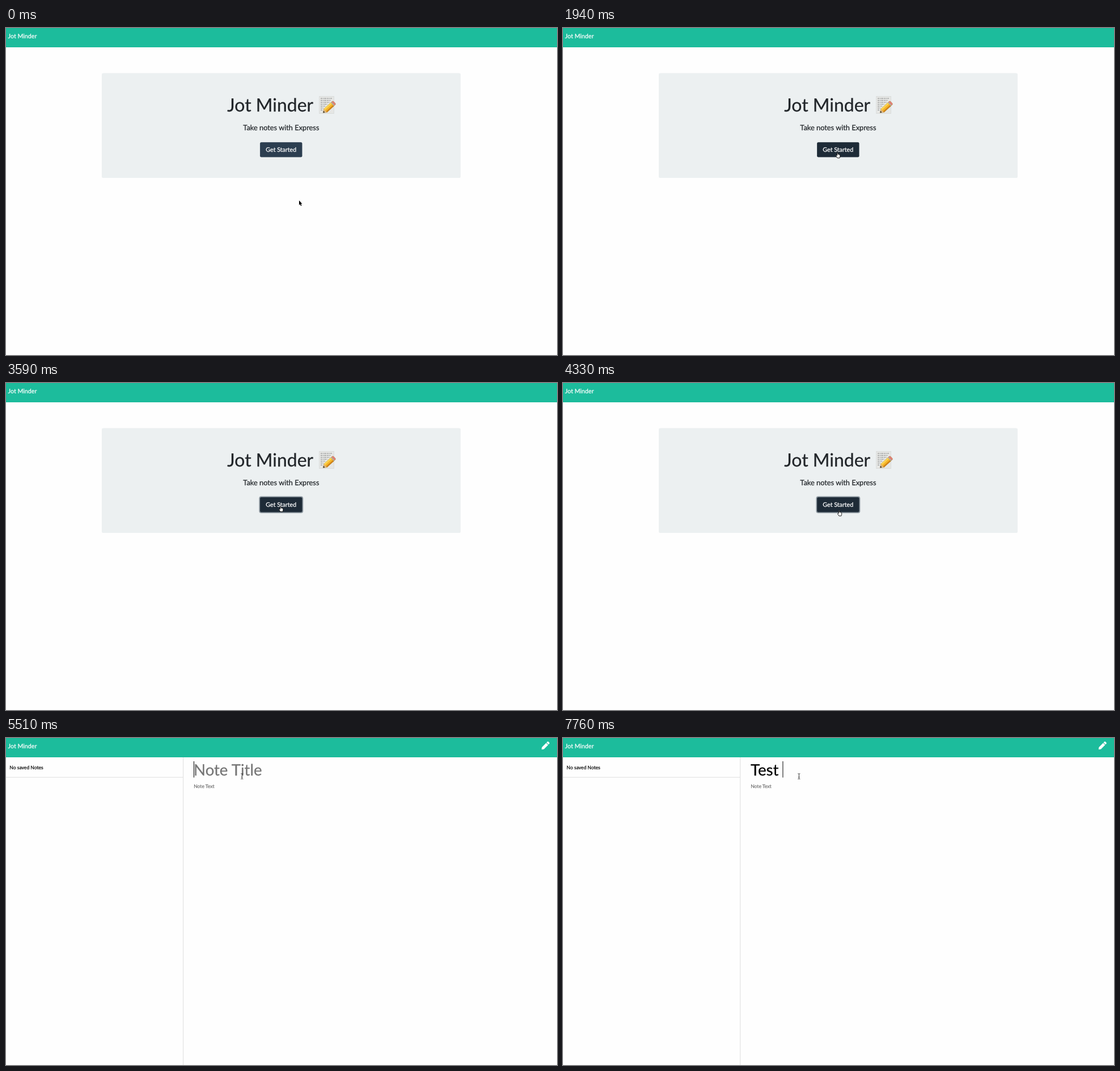
An HTML page for the animation above (8000 ms loop, 972x576 px).

```html
<!DOCTYPE html>
<html lang="en">
<head>
<meta charset="utf-8">
<title>Jot Minder</title>
<style>
  html, body { margin: 0; width: 100%; height: 100%; overflow: hidden; background: #fefefe; }
  svg { display: block; width: 972px; height: 576px; }
  text { font-family: Lato, "Open Sans", sans-serif; text-rendering: geometricPrecision; stroke-width: .25px; }
  .mid { text-anchor: middle; fill: #212529; stroke: #212529; }
  .brand, .label { font-size: 10.69px; fill: #fff; stroke: #fff; }
  .label { text-anchor: middle; }
  .small { font-size: 8.55px; }
  .title { font-size: 27.6px; }
  .off { display: none; }
</style>
</head>
<body>
<svg viewBox="0 0 972 576">
  <rect width="972" height="576" fill="#fefefe"/>
  <rect width="972" height="34" fill="#1cbc9c"/>
  <text class="brand" x="3.6" y="17.6">Jot Minder</text>

  <g id="home">
    <rect x="169" y="79.5" width="633" height="184.5" rx="2.6" fill="#ecf0f1"/>
    <text class="mid" x="466.3" y="147.2" font-size="32">Jot Minder</text>
    <g id="memo">
      <rect x="552.8" y="120.5" width="25.6" height="30.2" fill="#e6e7e5" stroke="#d0d2d1" stroke-width=".6"/>
      <path d="M555 124h20m-20 3.4h18m-18 3.4h16m-16 3.4h12m-12 3.4h8m-8 3.4h5m-5 3.4h4"
            stroke="#858787" stroke-width="1" stroke-dasharray="3 .9 1.6 .7 4 1" fill="none"/>
      <g transform="translate(559.4 149.2) rotate(-42)">
        <path d="M0 0L5.5-4H24.5Q27-4 27-2V2Q27 4 24.5 4H5.5Z" fill="#f6b62b" stroke="#8a6a2c" stroke-width=".5"/>
        <path d="M5.5-4H22V-1.4H5.5Z" fill="#fcd654"/>
        <path d="M5.5 1.8H22V4H5.5Z" fill="#d08218"/>
        <path d="M0 0L5.5-4V4Z" fill="#dfb77c"/>
        <path d="M0 0L2.6-1.9V1.9Z" fill="#333"/>
        <path d="M22-4H23.8V4H22Z" fill="#a9adaf"/>
        <path d="M23.8-4H24.5Q27-4 27-2V2Q27 4 24.5 4H23.8Z" fill="#dd8079"/>
      </g>
    </g>
    <text class="mid" x="485.4" y="180" font-size="12.8">Take notes with Express</text>
    <rect id="ring" x="446.4" y="199.6" width="77.9" height="29.7" rx="3.8" fill="#8c979f"/>
    <rect id="button" x="448.1" y="201.2" width="74.4" height="26.4" rx="2.4"/>
    <text class="label" x="485.3" y="218.3">Get Started</text>
  </g>

  <g id="notes">
    <path d="M0 69.2H312.5M312.7 34V576" stroke="#dedede" fill="none"/>
    <text class="small" x="6.3" y="54.6" fill="#111" stroke="#111">No saved Notes</text>
    <path transform="translate(944.8 6.2) scale(.0275)" fill="#fff"
      d="M498 142L452 188Q443 197 435 188L324 77Q315 69 324 60L370 14Q404-14 438 14L498 74Q526 108 498 142ZM284 100L22 362L0 484Q0 514 28 512L150 490L412 228Q421 219 412 211L301 100Q293 92 284 100Z"/>
    <text class="title" id="title" x="331" y="65.8"></text>
    <rect id="caret" y="41" width="1" height="28.6" fill="#000"/>
    <text class="small" x="331.2" y="87.8" fill="#757575" stroke="#757575">Note Text</text>
  </g>

  <g id="cursor">
    <path id="arrow" d="M0 0V8.2L1.8 6.5L3.1 9.6L4.5 9L3.2 6H5.5Z" stroke="#fff" stroke-width=".6" paint-order="stroke"/>
    <path id="hand" d="M2.2 5.5V1Q2.9-.2 3.6 1V3.4Q4.5 2.9 5 3.7Q5.8 3.3 6.3 4.1Q7.4 4 7.4 5.2V7.2L6.6 9.9H2.7L.4 6.6Q.1 5.2 1.2 5.3Z"
      fill="#fff" stroke="#111" stroke-width=".95" stroke-linejoin="round"/>
    <path id="beam" d="M-2-4.7H-.8L0-4.1L.8-4.7H2M0-4.1V4.1M-2 4.7H-.8L0 4.1L.8 4.7H2M-1 1.5H1" fill="none" stroke="#222" stroke-width=".9"/>
  </g>
</svg>
<script>
// The screen refreshes in ticks; all moments below count ticks.
const LOOP = 8000, TICK = 148.9;
const HOVER = 13, PRESS = 22, OPEN = 30, FOCUS = 37, BLINK = 2;
const TYPED = "Test\u00a0", KEYS = [43, 46, 47, 51, 52];
const FIELD_X = 331;

// Resting points of the pointer: tick, x, y
const STOPS = [
  [0, 517, 303.8], [4, 411.6, 332.8], [6, 418.5, 317.5], [7, 418.5, 317.5],
  [8, 477, 313.8], [15, 481.5, 216.8], [25, 481.5, 216.8], [29, 484.2, 224.2],
  [OPEN, 487.5, 223], [36, 416.3, 67.5]
];

const $ = id => document.getElementById(id);
const show = (id, on) => $(id).classList.toggle("off", !on);
const easeOut = p => 1 - (1 - p) ** 3;

function pointer(n) {
  const next = STOPS.findIndex(stop => stop[0] > n);
  if (next < 0) return STOPS[STOPS.length - 1].slice(1);
  const [t0, x0, y0] = STOPS[next - 1], [t1, x1, y1] = STOPS[next];
  const p = easeOut((n - t0) / (t1 - t0));
  return [x0 + (x1 - x0) * p, y0 + (y1 - y0) * p];
}

function drawHome(n) {
  $("button").setAttribute("fill", n >= HOVER ? "#1e2b37" : "#2c3e50");
  show("ring", n >= PRESS);
  $("ring").setAttribute("opacity", Math.min(1, (n - PRESS + 1) / 2));
}

function drawNotes(n) {
  const text = TYPED.slice(0, KEYS.filter(key => key <= n).length);
  const title = $("title"), color = text ? "#000" : "#757575";
  title.textContent = text || "Note Title";
  title.setAttribute("fill", color);
  title.setAttribute("stroke", color);
  show("caret", text || (n >= FOCUS && n < FOCUS + BLINK));
  $("caret").setAttribute("x", FIELD_X + (text ? title.getComputedTextLength() : 0));
}

function draw(n) {
  const open = n >= OPEN, hover = n >= HOVER;
  show("home", !open);
  show("notes", open);
  open ? drawNotes(n) : drawHome(n);
  $("cursor").setAttribute("transform", `translate(${pointer(n)})`);
  show("arrow", !hover);
  show("hand", hover && !open);
  show("beam", open);
}

const start = performance.now();
function frame() {
  draw(Math.floor((performance.now() - start) % LOOP / TICK));
  requestAnimationFrame(frame);
}
frame();
</script>
</body>
</html>
```
